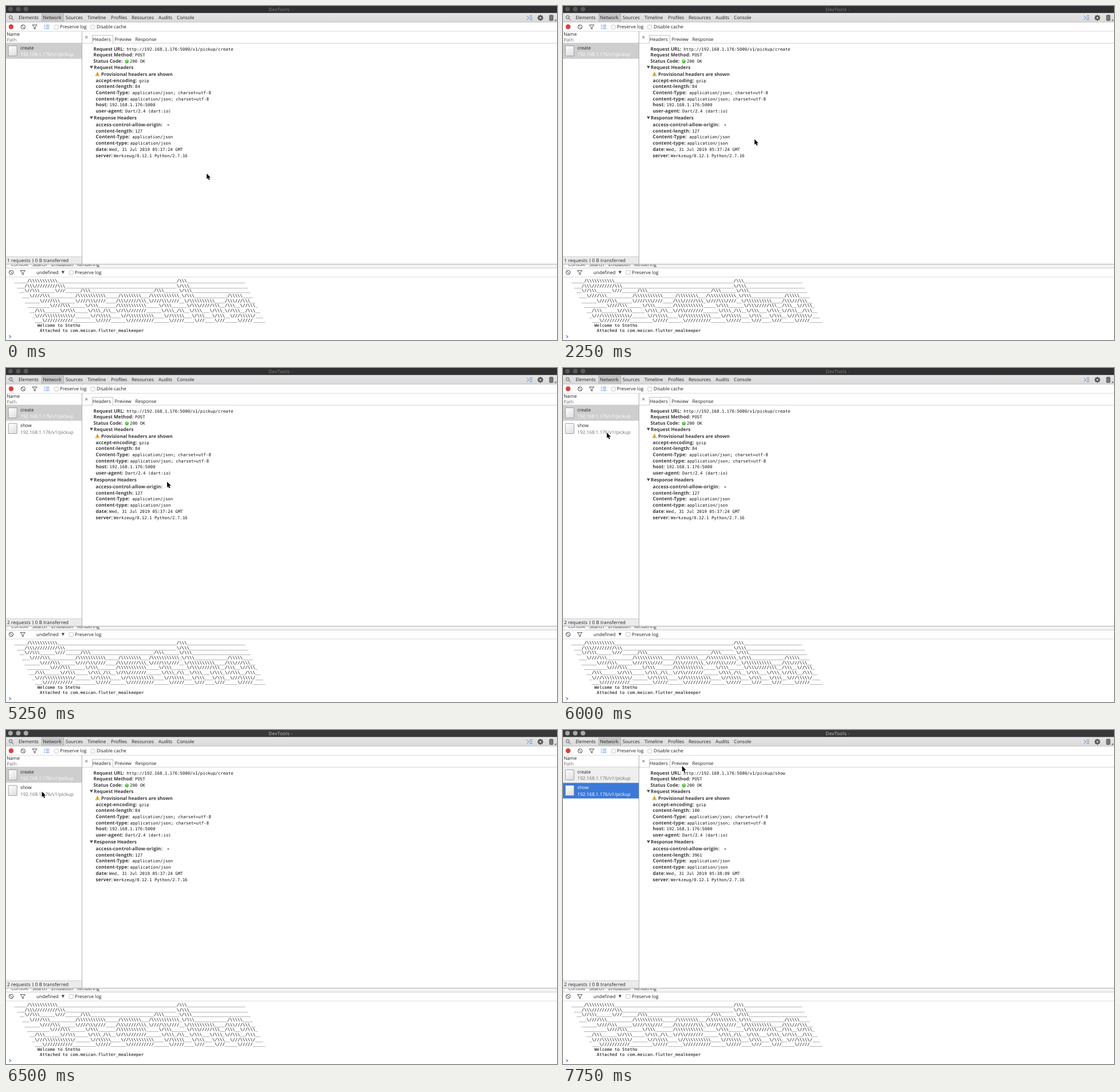
Write an HTML page that moves like this. It is 961x583 px and loops after 8 s.

```html
<!DOCTYPE html>
<html lang="en">
<head>
<meta charset="utf-8">
<title>Network inspector</title>
<style>
html, body { margin: 0; width: 100%; height: 100%; overflow: hidden; background: #fff; }
svg { display: block; }
text { font: 8.15px "Open Sans", "Noto Sans", sans-serif; fill: #1e1e1e; text-rendering: geometricPrecision; white-space: pre; }
.mono { font: 7.37px "DejaVu Sans Mono", monospace; fill: #141414; }
.art { font-size: 7.35px; fill: #000; }
.bold { font-weight: 700; font-size: 8.2px; fill: #3c3c3c; }
.key { font-size: 8.3px; letter-spacing: .12px; }
.dim { fill: #6c6c6c; }
.line { fill: none; stroke: #4c4c4c; stroke-width: 1; }
</style>
</head>
<body>
<svg id="stage" width="961" height="583" viewBox="0 0 961 583"></svg>
<script>
const LOOP = 8000, OPENED = 4500, FOCUSED = 6250, PICKED = 6750;

// Pointer tip: time, x, y. It jumps from one place to the next.
const POINTER = [
  [0, 350, 292.5], [250, 365.5, 271.5], [500, 382, 236.5], [1000, 390, 230.5],
  [1250, 390, 228.5], [2000, 340, 232.5], [2250, 334, 232.5], [4750, 332.5, 232.5],
  [5000, 300.5, 209.5], [5250, 281, 198.5], [5750, 137, 145.5], [6000, 76.5, 113],
  [6250, 69, 113], [6500, 62.5, 107.5], [6750, 59, 106], [7000, 75, 98.5],
  [7250, 160, 79.5], [7500, 193, 68.5], [7750, 207.7, 62.8]
];

const BANNER = String.raw`
_____/\\\\\\\\\\\_______________________________________________/\\\_______________________
___/\\\/////////\\\____________________________________________\/\\\_______________________
__\//\\\______\///______/\\\_________________________/\\\______\/\\\_______________________
___\////\\\__________/\\\\\\\\\\\_____/\\\\\\\\___/\\\\\\\\\\\_\/\\\_____________/\\\\\____
______\////\\\______\////\\\////____/\\\/////\\\_\////\\\////__\/\\\\\\\\\\____/\\\///\\\__
_________\////\\\______\/\\\_______/\\\\\\\\\\\_____\/\\\______\/\\\/////\\\__/\\\__\//\\\_
__/\\\______\//\\\_____\/\\\_/\\__\//\\///////______\/\\\_/\\__\/\\\___\/\\\_\//\\\__/\\\__
_\///\\\\\\\\\\\/______\//\\\\\____\//\\\\\\\\\\____\//\\\\\___\/\\\___\/\\\__\///\\\\\/___
___\///////////_________\/////______\//////////______\/////____\///____\///_____\/////_____
Welcome to Stetho
Attached to com.meican.flutter_mealkeeper`.trim().split("\n");

const rect = (x, y, w, h, fill, more = "") =>
  `<rect x="${x}" y="${y}" width="${w}" height="${h}" fill="${fill}" ${more}/>`;
const path = (d, more = 'class="line"') => `<path d="${d}" ${more}/>`;
const text = (x, y, s, cls = "", more = "") =>
  `<text x="${x}" y="${y}" class="${cls}" ${more}>${s}</text>`;
const dot = (x, y, r, more) => `<circle cx="${x}" cy="${y}" r="${r}" ${more}/>`;
const box = (x, y) => rect(x, y, 7, 7, "#fff", 'rx="1" stroke="#b8b8b8" stroke-width=".8"');
const clearIcon = (x, y) => dot(x, y, 3.7, 'class="line"') +
  path(`M${x - 2.6} ${y - 2.6}l5.2 5.2`);
const funnel = (x, y) => path(`M${x - 4.2} ${y - 3.5}h8.4l-3.2 3.8v3.6l-2 -1.2v-2.4z`);
const fold = y => path(`M146 ${y - 2.2}h6l-3 5z`, 'fill="#555"');

function titleBar() {
  return rect(0, 0, 961, 12.5, "#39393b", 'id="bar"') +
    '<g id="lights">' + [7.8, 21.4, 34.8].map(x => dot(x, 5.4, 4, "")).join("") + "</g>" +
    text(458, 8.5, "DevTools -", "", 'id="title" letter-spacing=".33"');
}

function toolbars() {
  const tabs = [["Elements", 22], ["Network", 64.5], ["Sources", 104], ["Timeline", 142],
    ["Profiles", 183], ["Resources", 219], ["Audits", 266], ["Console", 298]];
  const gear = Array.from({ length: 8 }, (_, i) =>
    `<path d="M932 15.4v2" stroke="#555" stroke-width="2" transform="rotate(${i * 45} 932 20.6)"/>`).join("");
  return rect(0, 12.5, 961, 15.5, "url(#chrome)") + rect(0, 27.7, 961, .8, "#b4b4b4") +
    rect(62, 12.8, 39, 14.9, "#c6c6c6") + rect(62, 12.8, .7, 14.9, "#aaa") + rect(100.4, 12.8, .7, 14.9, "#aaa") +
    tabs.map(([s, x]) => text(x, 23.4, s)).join("") +
    dot(8.2, 19.5, 2.7, 'class="line"') + path("M10.2 21.6l3 3.2") +
    path("M908.5 17.3l3.7 3.2l-3.7 3.2M913 17.3h5M914 20.5h4M913 23.7h5", 'fill="none" stroke="#4a83dc"') +
    gear + dot(932, 20.6, 2.8, 'fill="none" stroke="#555" stroke-width="2.4"') +
    rect(948, 16, 6, 9.3, "#777", 'rx=".8" stroke="#555"') + path("M956.5 26h3v-3z", 'fill="#555"') +
    rect(0, 43.7, 961, .8, "#cfcfcf") +
    dot(8.9, 36.3, 4.2, 'fill="#d8433d"') + clearIcon(29.8, 36.5) + funnel(50, 36.5) +
    path("M69.5 33.5h6M69.5 36.5h6M69.5 39.5h6M66.2 33.5h2M66.2 36.5h2M66.2 39.5h2",
      'fill="none" stroke="#4a83dc" stroke-width="1.1"') +
    box(84.3, 33.3) + text(94, 39.4, "Preserve log") +
    box(147.9, 33.3) + text(158, 39.4, "Disable cache");
}

function listRow(id, y, name) {
  return `<g id="${id}">` + rect(0, y, 132, 27.2, "#fff", 'class="back"') +
    rect(4.2, y + 4.4, 15, 17.8, "url(#paper)", 'rx=".6" stroke="#8c8c8c" stroke-width=".8"') +
    text(25, y + 10.8, name, "name") + text(25, y + 22.2, "192.168.1.176/v1/pickup", "path") + "</g>";
}

function sidebar() {
  return text(1.2, 52, "Name") + text(1.2, 62, "Path", "dim") +
    rect(0, 64.3, 132, .8, "#c4c4c4") +
    listRow("create", 65, "create") + listRow("show", 92.3, "show") +
    rect(0, 437.5, 132, 13, "#ebebeb") + rect(0, 437.3, 132, .8, "#c8c8c8") +
    text(2, 447, "", "", 'id="count" letter-spacing=".1"') +
    rect(46.6, 441, .8, 6.6, "#333") + text(50.8, 447, "0 B transferred", "", 'letter-spacing=".1"') +
    rect(132, 44, .9, 406.5, "#a5a5a5");
}

function details() {
  const rows = [
    [75, 152.5, "Request URL:", 210.3, "", "url"],
    [85.7, 152.5, "Request Method:", 225, "POST"],
    [96.5, 152.5, "Status Code:", 216, "200 OK"],
    [107, 153, "Request Headers"],
    [119, 166, "Provisional headers are shown"],
    [129.9, 156.5, "accept-encoding:", 232, "gzip"],
    [140.6, 156.5, "content-length:", 225, "", "sent"],
    [151.3, 156.5, "Content-Type:", 220.3, "application/json; charset=utf-8"],
    [162, 156.5, "content-type:", 216.6, "application/json; charset=utf-8"],
    [172.6, 156.5, "host:", 180.6, "192.168.1.176:5000"],
    [183.3, 156.5, "user-agent:", 208, "Dart/2.4 (dart:io)"],
    [195.2, 153, "Response Headers"],
    [207.3, 156.5, "access-control-allow-origin:", 280.8, "∗"],
    [218, 156.5, "content-length:", 225, "", "got"],
    [228.8, 156.5, "Content-Type:", 220.3, "application/json"],
    [239.5, 156.5, "content-type:", 216.6, "application/json"],
    [250.2, 156.5, "date:", 180, "", "date"],
    [260.9, 156.5, "server:", 188, "Werkzeug/0.12.1 Python/2.7.16"]
  ];
  const line = ([y, x, key, vx, value, id]) => {
    const base = Math.round(y + 2.6);
    return text(x, base, key, x === 156.5 ? "bold key" : "bold") +
      (vx ? text(vx, base, value, "mono", id ? `id="${id}"` : "") : "");
  };
  return path("M138.4 52.6l3.8 3.8m0 -3.8l-3.8 3.8") +
    rect(133, 64.6, 828, .8, "#c4c4c4") +
    path("M150.5 65.2v-14h36v14", 'fill="#fff" stroke="#b0b0b0" stroke-width=".8"') +
    text(151, 61, "Headers") + text(189.6, 61, "Preview") + text(225.6, 61, "Response") +
    rows.map(line).join("") +
    fold(106.7) + fold(194.9) +
    dot(210.8, 96.7, 3.2, 'fill="#4fbd3b"') + dot(210.8, 95.4, 1.5, 'fill="#a5e397"') +
    path("M159.5 115l3.7 7h-7.4z", 'fill="#f6c63c" stroke="#d0a032" stroke-width=".6" stroke-linejoin="round"') +
    path("M159.5 117.4v2.3m0 .7v.9", 'stroke="#444" stroke-width=".8"');
}

function drawer() {
  const tabs = [["Console", 9], ["Search", 46], ["Emulation", 79], ["Rendering", 124]];
  return rect(0, 450.2, 961, 1.2, "#a9a9a9") + rect(0, 451.4, 961, 6, "#f3f3f3") +
    rect(4, 451.4, 39, 6, "#fff") +
    '<g clip-path="url(#cut)">' + tabs.map(([s, x]) => text(x, 454, s)).join("") + "</g>" +
    rect(0, 457, 961, .8, "#c4c4c4") +
    clearIcon(9, 465) + funnel(29.2, 465.2) +
    text(53, 468, "undefined") + path("M96.8 462.6h5.2l-2.6 5z", 'fill="#444"') +
    box(110.2, 461.5) + text(120, 468, "Preserve log") +
    rect(0, 472.6, 961, .8, "#cfcfcf") +
    BANNER.map((s, i) => text(14.8 + i * 4.425, Math.round(482 + i * 8.65), s, "mono art")).join("") +
    path("M5.3 575l3.3 2.3l-3.3 2.3", 'fill="none" stroke="#3f79e0" stroke-width="1.1"');
}

const stage = document.getElementById("stage");
stage.innerHTML = `<defs>
  <linearGradient id="paper" x2=".6" y2="1"><stop stop-color="#fff"/><stop offset="1" stop-color="#e2e2e2"/></linearGradient>
  <linearGradient id="chrome" x2="0" y2="1"><stop stop-color="#e5e5e5"/><stop offset="1" stop-color="#dadada"/></linearGradient>
  <clipPath id="cut"><rect y="451.4" width="961" height="6"/></clipPath></defs>` +
  rect(0, 0, 961, 583, "#fff") + titleBar() + toolbars() + sidebar() + details() + drawer() +
  path("M0 0v9.6l2.2 -2l1.6 3.7l1.7 -.7l-1.6 -3.6h3z",
    'id="pointer" fill="#000" stroke="#fff" stroke-width=".7" paint-order="stroke"');

const el = id => document.getElementById(id);
const fill = (node, color) => { node.style.fill = color; };
const put = (id, s) => { if (el(id).textContent !== s) el(id).textContent = s; };

function paintRow(id, back, name, sub) {
  const row = el(id);
  fill(row.querySelector(".back"), back);
  fill(row.querySelector(".name"), name);
  fill(row.querySelector(".path"), sub);
}

function draw(t) {
  const opened = t >= OPENED, focused = t >= FOCUSED, picked = t >= PICKED;
  const [, x, y] = POINTER.filter(p => p[0] <= t).pop();
  el("pointer").setAttribute("transform", `translate(${x} ${y})`);

  fill(el("bar"), focused ? "#38383a" : "#303032");
  fill(el("lights"), focused ? "#a9a9ab" : "#58585a");
  fill(el("title"), focused ? "#c8c8ca" : "#858587");

  el("show").style.display = opened ? "" : "none";
  paintRow("create", picked ? "#efefef" : "#cecece", "#1e1e1e", picked ? "#6c6c6c" : "#fff");
  paintRow("show", picked ? "#3b79d8" : "#fff", picked ? "#fff" : "#1e1e1e", picked ? "#fff" : "#6c6c6c");

  put("count", (opened ? 2 : 1) + " requests");
  put("url", "http://192.168.1.176:5000/v1/pickup/" + (picked ? "show" : "create"));
  put("sent", picked ? "100" : "84");
  put("got", picked ? "3961" : "127");
  put("date", `Wed, 31 Jul 2019 05:${picked ? "38:09" : "37:24"} GMT`);
}

const start = performance.now();
function tick() {
  draw((performance.now() - start) % LOOP);
  requestAnimationFrame(tick);
}
tick();
</script>
</body>
</html>
```
